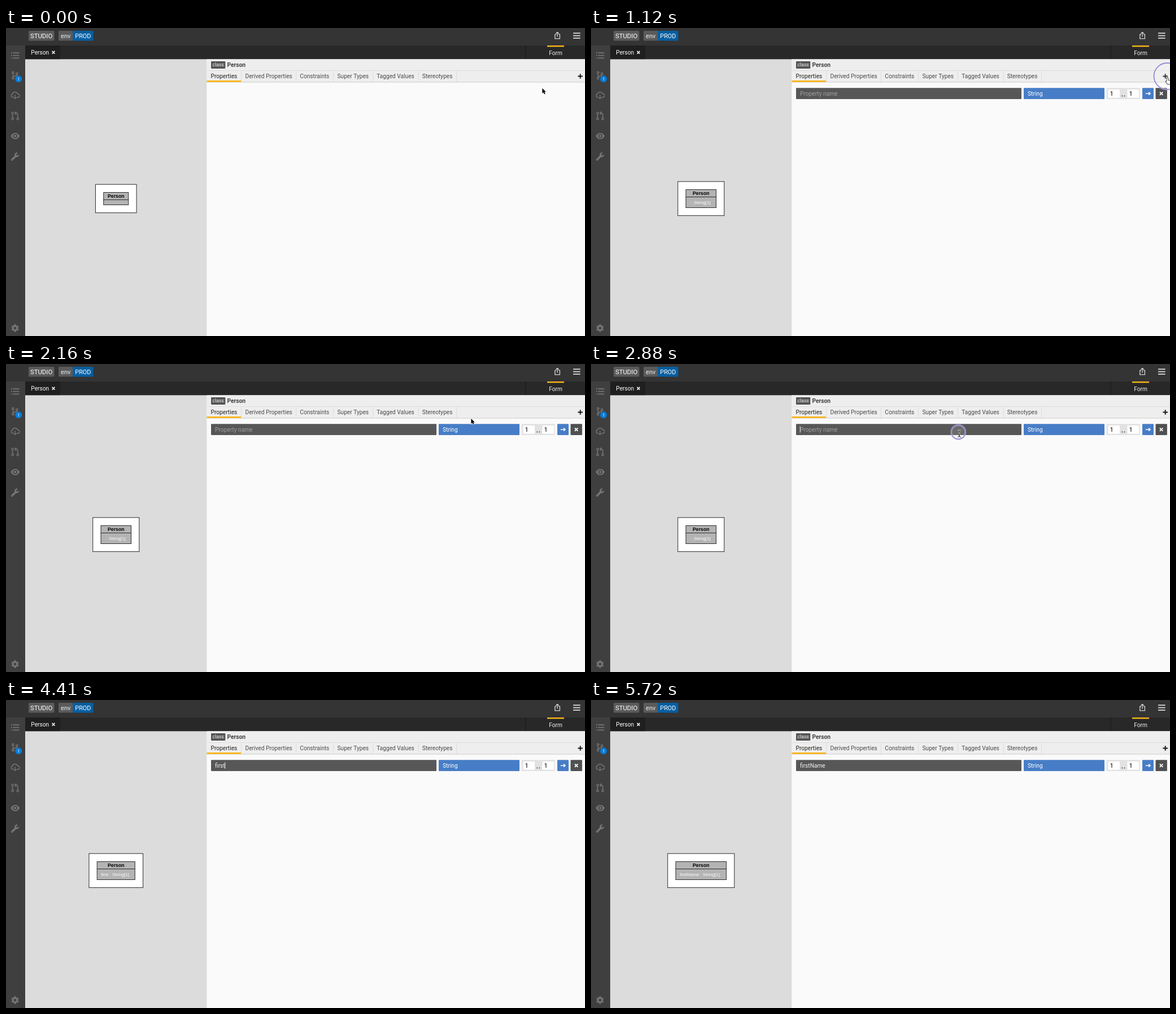
These frames come from a looping animation (1025x546 px, 6.13 s). An HTML page with a canvas:

```html
<!DOCTYPE html>
<html lang="en">
<head>
<meta charset="utf-8">
<title>Class editor</title>
<style>
  html, body { margin: 0; width: 100%; height: 100%; overflow: hidden; background: #fafafa; }
  canvas { display: block; width: 1025px; height: 546px; }
</style>
</head>
<body>
<canvas id="stage"></canvas>
<script>
const W = 1025, H = 546, LOOP = 6130, STEP = 80;
const UI = 'Roboto, sans-serif', DIAGRAM = '"Liberation Sans", Arial, sans-serif';
const SIZE = 10.18;
const canvas = document.getElementById('stage');
const g = canvas.getContext('2d');
const dpr = window.devicePixelRatio || 1;
canvas.width = W * dpr;
canvas.height = H * dpr;

const WORD = 'firstName';
const KEYS = [3920, 4000, 4080, 4330, 4410, 4910, 5070, 5150, 5310];
const ROW_AT = 1040;
const CLICKS = [
  { start: 960, shrink: 1120, end: 1600, x: 1020, y: 85.5, r: 23.5, last: 18 },
  { start: 2720, shrink: 2960, end: 3520, x: 650.3, y: 120.7, r: 12.5, last: 10 }
];

function rect(x, y, w, h, color, radius = 0) {
  g.fillStyle = color;
  g.beginPath();
  g.roundRect(x, y, w, h, radius);
  g.fill();
}

function frame(x, y, w, h, fill) {
  g.fillStyle = fill;
  g.fillRect(x, y, w, h);
  g.strokeStyle = '#2c2c2c';
  g.lineWidth = 1;
  g.strokeRect(x, y, w, h);
}

// y is the vertical middle of the capitals
function text(str, x, y, color, { size = SIZE, weight = 400, family = UI, align = 'left' } = {}) {
  g.font = `${weight} ${size}px ${family}`;
  g.textAlign = align;
  g.textBaseline = 'alphabetic';
  g.fillStyle = color;
  g.fillText(str, x, y + size * 0.356);
}

function widthOf(str, size, family) {
  g.font = `400 ${size}px ${family}`;
  return g.measureText(str).width;
}

function path(d, color, width, x = 0, y = 0) {
  g.save();
  g.translate(x, y);
  const p = new Path2D(d);
  if (width) {
    g.strokeStyle = color;
    g.lineWidth = width;
    g.stroke(p);
  } else {
    g.fillStyle = color;
    g.fill(p, 'evenodd');
  }
  g.restore();
}

function disc(x, y, r, color, width) {
  g.beginPath();
  g.arc(x, y, r, 0, Math.PI * 2);
  g.fillStyle = g.strokeStyle = color;
  if (width) { g.lineWidth = width; g.stroke(); } else g.fill();
}

const cross = (x, y, r, color, width) =>
  path(`M${-r} ${-r}L${r} ${r}M${r} ${-r}L${-r} ${r}`, color, width, x, y);

function gear(x, y, color) {
  g.save();
  g.translate(x, y);
  for (let i = 0; i < 6; i++) {
    rect(-1.7, -6.8, 3.4, 4, color, 0.6);
    g.rotate(Math.PI / 3);
  }
  disc(0, 0, 3.7, color, 2.8);
  g.restore();
}

function sidebar() {
  const c = '#757575';
  rect(0, 31, 34, H - 31, '#3f3f3f');
  for (const y of [44, 48.7, 53.4]) {
    rect(9, y - 0.9, 2, 1.8, c);
    rect(12.4, y - 0.9, 11, 1.8, c);
  }
  disc(12.4, 79.2, 1.7, c, 1.3);
  disc(12.4, 89.2, 1.7, c, 1.3);
  disc(19.4, 81.2, 1.7, c, 1.3);
  path('M12.4 81V87.4M19.4 83C19.4 86 12.6 84.5 12.4 87.4', c, 1.5);
  disc(22.2, 90.2, 6, '#0b7cd6');
  text('1', 22.2, 90.2, '#fff', { size: 7.3, align: 'center' });
  path('M13.2 123H12.2A3.2 3.2 0 0 1 11.7 116.7A4.5 4.5 0 0 1 20.2 116.3A3.3 3.3 0 0 1 20.6 123H18.8', c, 1.4);
  path('M16 118V125M13.6 122.6L16 125.2L18.4 122.6', c, 1.3);
  disc(11.6, 150.8, 1.7, c, 1.3);
  disc(11.6, 161.2, 1.7, c, 1.3);
  disc(20.8, 161.2, 1.7, c, 1.3);
  path('M11.6 152.5V159.4M20.8 159.4V153Q20.8 150.8 18.4 150.8H16.5M18.3 148.2L15.8 150.8L18.3 153.4', c, 1.5);
  path('M8.4 191.5Q11.5 186 16.3 186T24.2 191.5Q21.1 197 16.3 197T8.4 191.5ZM12.6 191.5A3.7 3.7 0 1 0 20 191.5A3.7 3.7 0 1 0 12.6 191.5Z', c);
  disc(16.3, 191.5, 2.2, c);
  path('M9.5 232.2L15.4 226.3A4.4 4.4 0 0 1 21 220.8L18.4 223.5L18.9 225.8L21 226.2L23.4 223.7A4.4 4.4 0 0 1 18 228.8L12 234.8A1.8 1.8 0 0 1 9.5 232.2ZM10.5 233.5A0.6 0.6 0 1 0 11.7 233.5A0.6 0.6 0 1 0 10.5 233.5Z', c);
  gear(16, 532, c);
}

function header() {
  rect(0, 0, W, 31, '#343434');
  rect(40, 5, 45.5, 17.5, '#5b5b5b', 1.5);
  text('STUDIO', 62.6, 13.9, '#fff', { size: 11.4, align: 'center' });
  rect(93, 5, 26, 17.5, '#5b5b5b', 1.5);
  text('env', 105.7, 13.9, '#eee', { size: 11, align: 'center' });
  rect(118, 5, 36.5, 17.5, '#075fa2', 1.5);
  text('PROD', 136.4, 13.9, '#fff', { size: 10.9, align: 'center' });
  path('M974 11.3H971.8V18.8H980.4V11.3H978.2M976.1 15.5V8M973.5 10L976.1 7.4L978.7 10', '#d8d8d8', 1.3);
  for (const y of [9.2, 13.6, 18]) rect(1004, y - 0.9, 12.6, 1.8, '#d8d8d8');

  rect(34, 31, W - 34, 24.5, '#282828');
  rect(34, 31, 62, 24.5, '#1f1f1f');
  text('Person', 44.3, 43.3, '#fff');
  cross(84, 43.3, 2.4, '#fff', 1.6);
  rect(919.5, 31, 1, 24.5, '#191919');
  rect(958, 31, 30, 2.4, '#fbb517');
  text('Form', 973, 44.7, '#f2f2f2', { align: 'center' });
}

function panel() {
  rect(34, 55.5, 321.5, H - 55.5, '#dcdcdc');
  rect(355.5, 55.5, W - 355.5, H - 55.5, '#fafafa');
  rect(355.5, 55.5, W - 355.5, 41, '#eeeeee');
  rect(355.5, 75.3, W - 355.5, 0.8, '#d8d8d8');
  rect(355.5, 95.6, W - 355.5, 1, '#cfcfcf');
  rect(363, 59, 25.3, 13, '#555', 1.2);
  text('class', 375.6, 65.3, '#f4f4f4', { size: 8.7, align: 'center' });
  text('Person', 391.6, 65.6, '#3f3f3f', { weight: 700 });
  const tabs = [['Properties', 362.5, 416], ['Derived Properties', 423.5, 513], ['Constraints', 520.3, 579],
    ['Super Types', 586.5, 649], ['Tagged Values', 656.2, 729.6], ['Stereotypes', 736.7, 797.2]];
  tabs.forEach(([label, x, edge], i) => {
    text(label, x, 85.8, i ? '#4a4a4a' : '#222');
    rect(edge, 76, 0.8, 20, '#d9d9d9');
  });
  rect(355.5, 93, 60.5, 2.8, '#fbb517');
  path('M1012.4 85.5H1021M1016.7 81.2V89.8', '#151515', 1.9);
}

function row(t, typed) {
  rect(363, 106.3, 399, 19.8, '#575757', 1);
  if (typed) text(typed, 370, 116.4, '#f2f2f2');
  else text('Property name', 370, 116.4, '#a0a0a0');
  const caretOn = (t >= 2800 && t < 3280) || (t >= 3680 && t < 5720);
  if (caretOn) rect(370 + widthOf(typed, SIZE, UI) - 0.3, 110.3, 0.9, 11.7, '#f2f2f2');

  rect(766, 106.3, 143, 19.8, '#477dc6', 1);
  text('String', 773, 116.4, '#fff');
  rect(912.7, 106.3, 59, 19.8, '#e2e2e2', 1);
  for (const x of [915.5, 949.5]) {
    rect(x, 109, 20.5, 14.7, '#fff');
    text('1', x + 3.3, 116.4, '#222', { weight: 500 });
  }
  for (const x of [939.4, 943.6]) rect(x, 119.6, 1.7, 1.7, '#444');
  rect(976, 106.3, 20, 19.8, '#477dc6', 1);
  path('M981.8 116.2H989.5M987.2 113.6L990 116.2L987.2 118.8', '#fff', 1.5);
  rect(999.5, 106.3, 20.4, 19.8, '#505050', 1);
  cross(1009.6, 116.2, 2.7, '#fff', 1.8);
}

function diagram(hasRow, typed) {
  const label = typed + ' : String[1]', mid = 194.75;
  const w = hasRow ? 15.1 + widthOf(label, 8, DIAGRAM) * 1.0525 : 44;
  const top = hasRow ? 286.5 : 291.5, h = hasRow ? 32 : 22;
  const left = mid - w / 2;
  frame(left - 14.3, top - 14.3, w + 28.6, h + 28.4, '#fff');
  frame(left, top, w, 13, '#b3b3b3');
  frame(left, top + 13, w, h - 13, '#b3b3b3');
  text('Person', mid, top + 6.7, '#000', { size: 8.72, weight: 700, family: DIAGRAM, align: 'center' });
  if (hasRow) text(label, left + 7.2, top + 22.3, '#fff', { size: 8, family: DIAGRAM });
}

const clamp = v => Math.max(0, Math.min(1, v));
const mix = (a, b, u) => a + (b - a) * u;

function pointer(t) {
  if (t < 1760) {
    const u = clamp(t / 680), e = (1 - Math.cos(Math.PI * u)) / 2;
    return { x: mix(949, 1020.5, e), y: mix(106, 88, e) };
  }
  if (t < 2160) {
    const e = Math.pow((t - 1760) / 400, 1.6);
    return { x: mix(1020.5, 823, e), y: mix(88, 96, e) };
  }
  if (t < 2400) {
    const u = (t - 2160) / 240;
    return { x: mix(823, 664, 1 - Math.pow(1 - u, 1.3)), y: mix(96, 120.5, u) };
  }
  const u = clamp((t - 2400) / 160), e = 1 - (1 - u) * (1 - u);
  return { x: mix(664, 652, e), y: mix(120.5, 123.7, e) };
}

function ring(t) {
  for (const c of CLICKS) {
    if (t < c.start || t >= c.end) continue;
    const grow = mix(0.5, 1, clamp((t - c.start) / 160));
    const out = clamp((t - c.shrink) / (c.end - STEP - c.shrink));
    g.globalAlpha = mix(1, 0.25, out);
    const r = mix(c.r, c.last, out) * grow;
    disc(c.x, c.y, r, 'rgba(255,255,255,0.12)');
    disc(c.x, c.y, r, 'rgba(255,255,255,0.35)', 3);
    disc(c.x, c.y, r, '#968bd8', 1.9);
    g.globalAlpha = 1;
  }
}

function drawPointer(t) {
  if (t >= KEYS[0]) return;
  const { x, y } = pointer(t);
  let shape, fill = '#000', edge = '#fff';
  if (y > 106 && x < 762) {
    const beam = 'M-2.8 -5.8Q0 -5.8 0 -3.6V3.8Q0 6 -2.8 6M2.8 -5.8Q0 -5.8 0 -3.6M0 3.8Q0 6 2.8 6M-1.6 2H1.6';
    path(beam, '#fff', 2.2, x, y);
    path(beam, '#111', 1, x, y);
    return;
  }
  if (t >= 720 && x > 1009) {
    shape = 'M-1.1 1Q0 -0.4 1.1 1V4.4L5.4 5.5Q6.4 6 6 8.2L5 11.5H0.4L-3 7.3Q-3.2 5.8 -1.1 6.8Z';
    fill = '#fff';
    edge = '#000';
  } else shape = 'M0.4 0.8V10L2.5 8L4 11.4L5.6 10.7L4.2 7.5H7Z';
  path(shape, edge, 1.4, x, y);
  path(shape, fill, 0, x, y);
}

function draw(now) {
  const t = now % LOOP;
  const held = Math.floor(t / STEP) * STEP;
  const typed = WORD.slice(0, KEYS.filter(k => k <= t).length);
  const hasRow = t >= ROW_AT;
  g.setTransform(dpr, 0, 0, dpr, 0, 0);
  g.lineCap = 'butt';
  g.lineJoin = 'miter';
  header();
  sidebar();
  panel();
  diagram(hasRow, typed);
  if (hasRow) row(t, typed);
  ring(held);
  drawPointer(held);
}

const begin = performance.now();
function tick() {
  draw(performance.now() - begin);
  requestAnimationFrame(tick);
}
tick();
</script>
</body>
</html>
```
